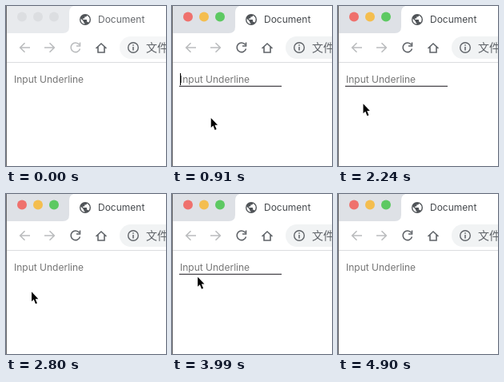
An HTML page that plays this animation: 200 px wide and 200 px high, repeating every 4.97 s.

```html
<!DOCTYPE html>
<html lang="en">
<head>
<meta charset="utf-8">
<title>Document</title>
<style>
  html, body { margin: 0; width: 100%; height: 100%; overflow: hidden; background: #fff; }
  svg { display: block; width: 100vw; height: 100vh; }
  text { font: 12px Inter, Roboto, sans-serif; }
  .strip { fill: #dee1e6; }
  .icon { fill: none; stroke: #5f6368; stroke-width: 1.6; }
  .dim { stroke: #babcbe; }
  .tab { fill: #45494d; }
  .pill { fill: #f1f3f4; }
  .inactive .strip { fill: #e8eaed; }
  .inactive .light { fill: #dcdee1; }
  .inactive .reload { stroke: #babcbe; }
  .inactive .tab { fill: #66696d; }
  .inactive .pill { fill: #f5f6f7; }
</style>
</head>
<body>
<svg id="stage" viewBox="0 0 200 200">
  <rect width="200" height="200" fill="#fff"/>
  <path class="strip" d="M0 0H84Q79 2 79 8V26Q79 34 71 34H0Z"/>
  <circle class="light" cx="20" cy="13.5" r="6" fill="#ef716d"/>
  <circle class="light" cx="40" cy="13.5" r="6" fill="#f4be4f"/>
  <circle class="light" cx="60" cy="13.5" r="6" fill="#5dc962"/>
  <g transform="translate(90.6 8.6) scale(.7)">
    <circle cx="12" cy="12" r="10" fill="#505458"/>
    <path fill="#fff" d="M4.200 10.200L9 15v1q0 2 2 2v2Q4 19 4 12zM15 4.600Q20 7 20 12 20 15 17.900 17.400 17.400 16 16 16H15V13q0-1-1-1H8V10h2q1 0 1-1V7h2q2 0 2-2z"/>
  </g>
  <text class="tab" x="115" y="21">Document</text>

  <path class="icon dim" d="M30 52H18M23.500 46.200L17.700 52l5.800 5.800M48 52H60M54.500 46.200L60.300 52l-5.800 5.800"/>
  <path class="icon reload" d="M91.500 48.200A5.800 5.800 0 1 0 92.500 53.500M92.500 45.500V50H88"/>
  <path class="icon" d="M112.500 53L119 47l6.500 6M115 51V58H123V51"/>
  <rect class="pill" x="142" y="38" width="80" height="28" rx="14"/>
  <circle class="icon" cx="159" cy="52" r="6.300" style="stroke-width:1.400"/>
  <path class="icon" d="M159 51V55.500M159 48.200V49.800" style="stroke-width:1.500"/>
  <text x="175" y="57" fill="#5f6368" style="font:14px 'Noto Sans CJK SC','Noto Sans CJK',sans-serif">文件</text>
  <rect y="70" width="200" height="1" fill="#dcdddf"/>
  <rect width="1" height="200" fill="#6a6a6c"/>

  <text x="10" y="96" fill="#757575">Input Underline</text>
  <rect id="line" y="99.700" height="1.200" fill="#3d3a40"/>
  <rect id="caret" x="10" y="84" width="1" height="15" fill="#000"/>
  <circle id="ring" r="21.300" fill="none" stroke="#000" stroke-width="1.400"/>
  <path id="arrow" d="M.3.500V12.500L3 10 5.200 15.500 7.200 14.600 5 9.300H8.600Z" stroke="#fff" paint-order="stroke"/>
  <path id="beam" d="M-3-8Q0-8 0-6.500Q0-8 3-8M0-6.500V6.500M-3 8Q0 8 0 6.500Q0 8 3 8M-1.500 3H1.500" fill="none" stroke="#222"/>
</svg>
<script>
const LOOP = 4970, STEP = 70;
const GROW = 400, BLINK = 540, RING = 90;
const LEFT = 9, RIGHT = 137, FIELD_BOTTOM = 100;

const [stage, line, caret, ring, arrow, beam] =
  ['stage', 'line', 'caret', 'ring', 'arrow', 'beam'].map(id => document.getElementById(id));

// places where the pointer rests
const rests = [
  { from: 0, to: 0, x: 68, y: 201 },
  { from: 420, to: 560, x: 58.5, y: 160 },
  { from: 1470, to: 2030, x: 28, y: 97.5 },
  { from: 2380, to: 2590, x: 33, y: 135 },
  { from: 3150, to: 3850, x: 29, y: 93.5 },
  { from: 4270, to: 4410, x: 40, y: 131 },
  { from: 4830, to: LOOP, x: 56, y: 203 }
];
// clicks alternately focus and blur the field
const clicks = [460, 2370, 3310, 4320];

const show = (node, on) => node.setAttribute('visibility', on ? 'visible' : 'hidden');
const clamp = p => Math.min(1, Math.max(0, p));
const smooth = p => p * p * (3 - 2 * p);

// CSS "ease": solve the bezier for its parameter, then read its height
function ease(p) {
  if (p <= 0 || p >= 1) return clamp(p);
  const bezier = (u, a, b) => 3 * u * (1 - u) ** 2 * a + 3 * u * u * (1 - u) * b + u ** 3;
  let lo = 0, hi = 1;
  for (let i = 0; i < 20; i++) {
    const mid = (lo + hi) / 2;
    if (bezier(mid, .25, .25) < p) lo = mid; else hi = mid;
  }
  return bezier(lo, .1, 1);
}

function pointer(t) {
  const i = rests.findLastIndex(r => r.to <= t);
  const a = rests[i], b = rests[i + 1] || a;
  const p = smooth(clamp((t - a.to) / (b.from - a.to)));
  return [a.x + (b.x - a.x) * p, a.y + (b.y - a.y) * p];
}

function draw(t) {
  const last = clicks.findLastIndex(c => c <= t);
  const since = last < 0 ? Infinity : t - clicks[last];
  const focused = last >= 0 && last % 2 === 0;
  stage.classList.toggle('inactive', last < 0);

  // grows from the left, then leaves towards the right
  const edge = LEFT + (RIGHT - LEFT) * ease(since / GROW);
  const x0 = focused ? LEFT : edge;
  const x1 = focused ? edge : RIGHT;
  line.setAttribute('x', x0);
  line.setAttribute('width', x1 - x0);
  show(caret, focused && since % (2 * BLINK) < BLINK);

  const [x, y] = pointer(t);
  for (const node of [arrow, beam, ring]) node.setAttribute('transform', `translate(${x} ${y})`);
  show(arrow, y >= FIELD_BOTTOM);
  show(beam, y < FIELD_BOTTOM);
  show(ring, since < RING);
}

const start = performance.now();
function tick() {
  const t = (performance.now() - start) % LOOP;
  draw(Math.floor(t / STEP) * STEP);
  requestAnimationFrame(tick);
}
tick();
</script>
</body>
</html>
```
